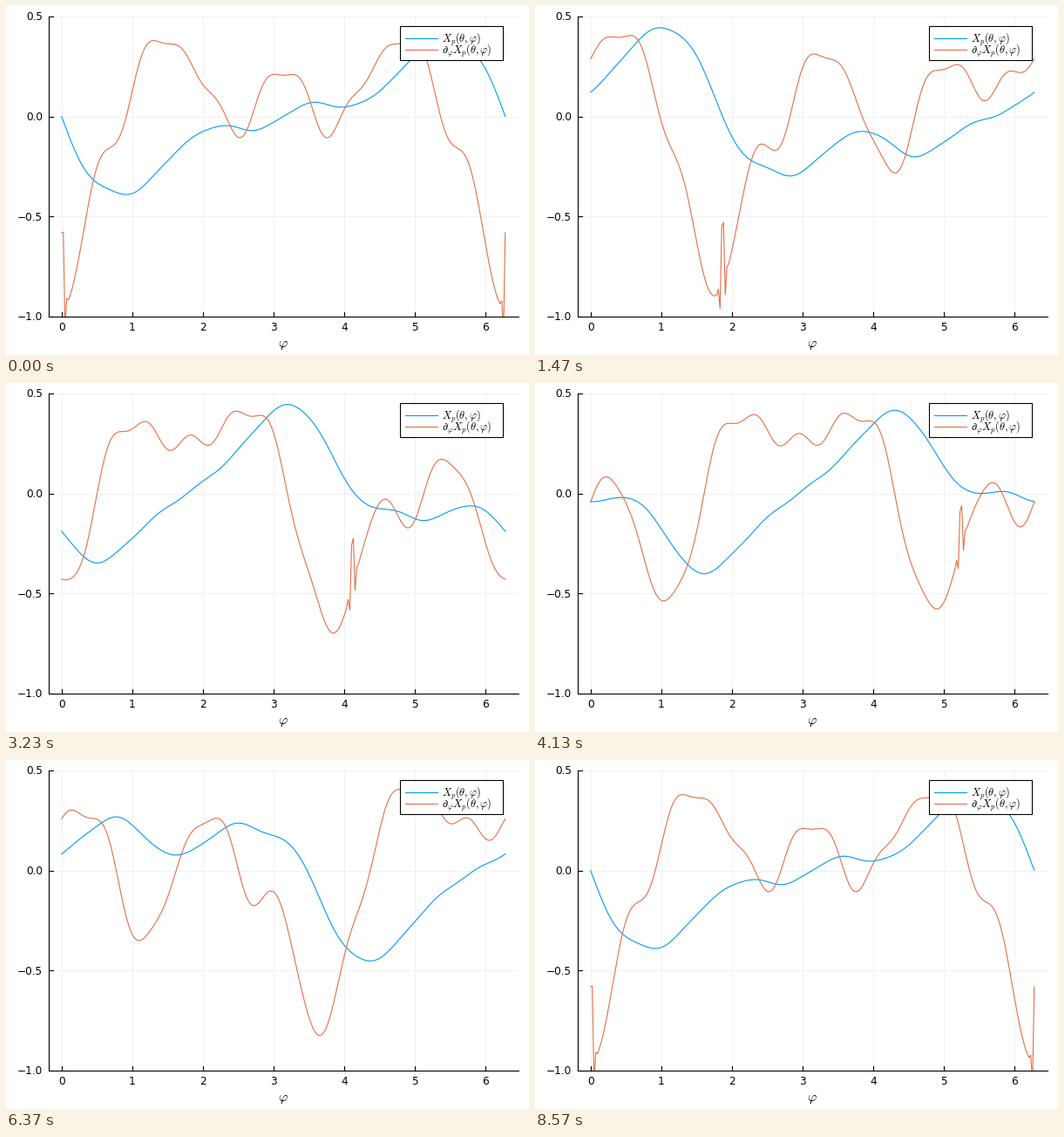
These frames come from a looping animation (600 px wide and 400 px high, 8610 ms). A matplotlib script:

```python
import numpy as np
import matplotlib.pyplot as plt
from matplotlib.animation import FuncAnimation
from matplotlib.patches import Rectangle

plt.rcParams.update({"font.family": "DejaVu Sans", "mathtext.fontset": "cm"})

TAU = 2 * np.pi
LOOP_MS, TICK_MS = 8610, 15
STEPS = 257                 # theta steps per turn, shown 30 per second
OMEGA = np.sqrt(3)          # the seam travels along phi = OMEGA * theta
BLUE, RED = "#009AFA", "#E36F47"

# X = sum of slope / n * sin(n phi - m theta), listed as n: {m: slope}.
# m / n stays close to OMEGA, so the shape drifts along and changes slowly.
MODES = {
    1: {2: -.270, 1: .012},
    2: {3: -.277, 4: -.063},
    3: {5: -.209, 4: .020, 6: -.022},
    4: {7: .077, 6: -.044},
    5: {8: -.090, 9: .015},
    6: {10: -.020},
    7: {12: -.039, 11: -.023},
    8: {14: -.029, 13: -.012},
    9: {16: -.008},
    10: {17: -.010},
    11: {19: .030},
}
phi = np.linspace(0, TAU, STEPS + 1)


def seam(k, theta):
    """Jagged spike in the slope where the first characteristic passes."""
    s = np.arange(STEPS + 1) - OMEGA * k
    if k == 0:
        s = (s + 128) % STEPS - 128
    shape = np.interp(np.ceil(s), np.arange(-3, 5),
                      [0, .07, -.3, 1, 1, -.3, .07, 0])
    return .38 * np.exp(-.22 * theta) * shape


def curves(k):
    theta = TAU * k / STEPS
    x, dx = np.zeros_like(phi), seam(k, theta)
    for n, waves in MODES.items():
        for m, slope in waves.items():
            angle = n * phi - m * theta
            x += slope / n * np.sin(angle)
            dx += slope * np.cos(angle)
    return x, dx


# Everything is placed in pixels, y downwards.
LEFT, RIGHT, TOP, BOTTOM = 48.5, 588, 12, 355.5


def px(v):
    return LEFT + (v / TAU + .03) / 1.06 * (RIGHT - LEFT)


def py(v):
    return BOTTOM - (v + 1) / 1.5 * (BOTTOM - TOP)


fig = plt.figure(figsize=(6, 4), dpi=100, facecolor="white")
ax = fig.add_axes([0, 0, 1, 1])
ax.set_xlim(0, 600)
ax.set_ylim(400, 0)
ax.axis("off")


def line(xs, ys, color="black", width=.8, z=1):
    return ax.plot(xs, ys, color=color, lw=width, zorder=z)[0]


for v in range(7):
    x = px(v)
    line([x, x], [TOP, BOTTOM], "#f1f1f1", .72)
    line([x, x], [BOTTOM, BOTTOM - 5], z=2)
    ax.text(x, 372, str(v), fontsize=8.7, ha="center", va="baseline")
for v in (-1, -.5, 0, .5):
    y = py(v)
    line([LEFT, RIGHT], [y, y], "#f1f1f1", .72)
    line([LEFT, LEFT + 5], [y, y], z=2)
    ax.text(42, y + 4.5, f"{v:.1f}".replace("-", "−"), fontsize=8.7,
            ha="right", va="baseline")
line([LEFT, LEFT, RIGHT], [TOP, BOTTOM, BOTTOM], z=2)
ax.text(318, 391, r"$\varphi$", fontsize=11.5, ha="center", va="baseline")

frame = Rectangle((LEFT, TOP), RIGHT - LEFT, BOTTOM - TOP,
                  transform=ax.transData)
blue = line(px(phi), 0 * phi, BLUE, z=3)
red = line(px(phi), 0 * phi, RED, z=3)
for curve in (blue, red):
    curve.set_clip_path(frame)

ax.add_patch(Rectangle((452, 23), 118, 39, fc="white", ec="black", lw=.8,
                       zorder=4))
for y, color, label in [(36.5, BLUE, r"$X_p(\theta,\varphi)$"),
                        (49.5, RED, r"$\partial_\varphi X_p(\theta,\varphi)$")]:
    line([458, 494.5], [y, y], color, z=5)
    ax.text(500, y + 4, label, fontsize=8.8, va="baseline", zorder=5)


def draw(i):
    # Round each step's start to the coarser clock
    k = min(int((i * TICK_MS + 13.4) * .03), STEPS) % STEPS
    x, dx = curves(k)
    blue.set_ydata(py(x))
    red.set_ydata(py(dx))
    return blue, red


anim = FuncAnimation(fig, draw, frames=LOOP_MS // TICK_MS, interval=TICK_MS,
                     repeat=True, repeat_delay=0)
plt.show()
```
